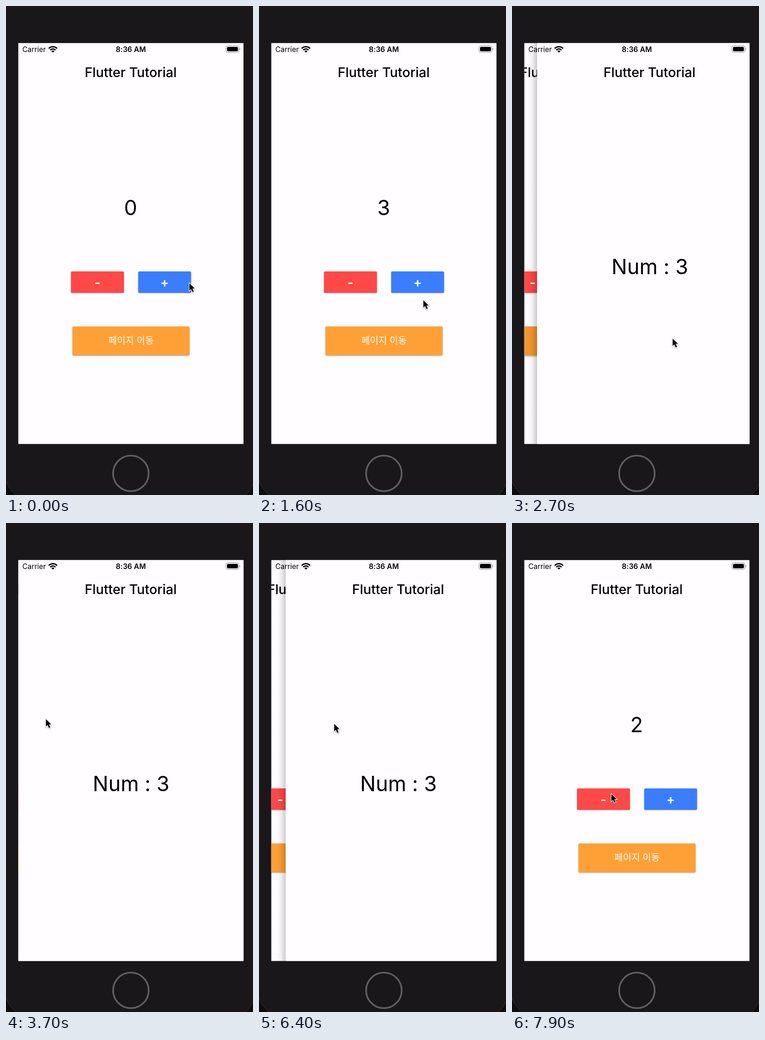
Recreate the animation shown at these times as an HTML page. Size 532 by 1052 pixels, loop 8000 ms.

```html
<!DOCTYPE html>
<html lang="ko">
<head>
<meta charset="utf-8">
<title>Flutter Tutorial</title>
<style>
  html, body { margin: 0; width: 100%; height: 100%; overflow: hidden; background: #19171a; }
  svg { display: block; width: 100%; height: 100%; }
  text { font-family: Inter, "Noto Sans", sans-serif; text-anchor: middle; }
  .title { font-size: 28.6px; font-weight: 500; }
  .big { font-size: 44.8px; }
  .status { font-size: 15.5px; }
  .sign { font-size: 28px; font-weight: 600; fill: #fff; }
  .label { font: 500 20px "Noto Sans CJK KR", "Noto Sans CJK", sans-serif; fill: #fff; }
  #cursor { filter: drop-shadow(0 1.5px 1.5px rgba(0, 0, 0, .35)); }
</style>
</head>
<body>
<svg viewBox="0 0 532 1052">
  <defs>
    <clipPath id="screen"><rect x="26.5" y="79.8" width="485" height="862.5"/></clipPath>
    <linearGradient id="edge">
      <stop offset="0" stop-opacity="0"/>
      <stop offset=".3" stop-opacity=".016"/>
      <stop offset=".6" stop-opacity=".07"/>
      <stop offset="1" stop-opacity=".22"/>
    </linearGradient>
  </defs>

  <!-- phone body -->
  <g fill="#0d0d0e" stroke="#343335">
    <path d="M-1 1020Q6 1040 23 1053H-1z"/>
    <path d="M533 1027Q527 1042 515 1053H533z"/>
  </g>
  <circle cx="269" cy="1005.5" r="38.3" fill="none" stroke="#5f5e60" stroke-width="3.6"/>

  <g clip-path="url(#screen)">
    <rect x="26" y="79" width="486" height="864" fill="#fffdff"/>
    <g id="home">
      <text class="title" x="268.5" y="153">Flutter Tutorial</text>
      <text class="big" id="count" x="268.5" y="450">0</text>
      <g id="buttons"></g>
    </g>
    <g id="detail">
      <rect id="shade" x="2.5" y="79" width="24.2" height="864" fill="url(#edge)"/>
      <rect x="26.5" y="79" width="486" height="864" fill="#fffdff"/>
      <text class="title" x="268.5" y="153">Flutter Tutorial</text>
      <text class="big" x="269.3" y="576.5">Num : 3</text>
    </g>
  </g>

  <!-- status bar -->
  <text class="status" x="60.5" y="99">Carrier</text>
  <text class="status" x="269" y="99" font-weight="600" letter-spacing=".1">8:36 AM</text>
  <g transform="translate(101 100.3)" fill="none" stroke="#000" stroke-width="2.8">
    <path d="M-9 -8.8A12.6 12.6 0 0 1 9 -8.8M-5.7 -5.6A8 8 0 0 1 5.7 -5.6"/>
    <path d="M0 0L-3.3 -3.2A4.6 4.6 0 0 1 3.3 -3.2z" fill="#000" stroke="none"/>
  </g>
  <rect x="473.7" y="85.7" width="28" height="14.2" rx="4" fill="none" stroke="#8a8a8a"/>
  <rect x="476" y="88" width="23.5" height="9.6" rx="2.3"/>
  <path d="M503 90.5Q506 92.8 503 95z" fill="#8a8a8a"/>

  <g id="cursor">
    <path d="M0 0V16.8L3.8 13.2L7 20.3L10 19L7 12H12.2z" transform="scale(.94)"
          stroke="#fff" stroke-width="2.4" paint-order="stroke"/>
  </g>
</svg>
<script>
const $ = id => document.getElementById(id);
const LOOP = 8000, STEP = 100, WIDTH = 485, FADE = 150;
const clamp = v => Math.max(0, Math.min(1, v));
const easeOut = (u, power) => 1 - (1 - clamp(u)) ** power;

const buttons = [
  { id: 'minus', x: 140, y: 571, w: 114, h: 46, color: '#ff4848', text: '-', cls: 'sign', base: 605 },
  { id: 'plus', x: 284.8, y: 571, w: 113.7, h: 46, color: '#3b7dff', text: '+', cls: 'sign', base: 605 },
  { id: 'go', x: 143.3, y: 689.5, w: 252, h: 62, color: '#ffa036', text: '페이지 이동', cls: 'label', base: 727 }
];

$('buttons').innerHTML = buttons.map(b => {
  const rect = attrs => `<rect x="${b.x}" y="${b.y}" width="${b.w}" height="${b.h}" rx="2.6" ${attrs}/>`;
  return `<clipPath id="${b.id}Clip">${rect('')}</clipPath>
    ${rect(`id="${b.id}" fill="${b.color}"`)}
    ${rect(`id="${b.id}Tint"`)}
    <circle id="${b.id}Ripple" clip-path="url(#${b.id}Clip)"/>
    <text class="${b.cls}" x="${b.x + b.w / 2}" y="${b.base}">${b.text}</text>`;
}).join('');

const taps = [
  { id: 'plus', at: 250, hold: 150, add: 1 },
  { id: 'plus', at: 580, hold: 150, add: 1 },
  { id: 'plus', at: 960, hold: 150, add: 1 },
  { id: 'go', at: 2350, hold: 350, add: 0 },
  { id: 'minus', at: 7550, hold: 150, add: -1 }
];

// Pointer moves in order; it rests between them
const rest = { x: 395, y: 596.5 };
const moves = [
  { from: 0, to: 300, x: 357.5, y: 597.5 },      // plus button
  { from: 1300, to: 2300, x: 346, y: 715.5 },    // page button
  { from: 3300, to: 3700, x: 86, y: 422 },
  { from: 3800, to: 4200, x: 56, y: 411 },
  { from: 4300, to: 5190, x: 329, y: 424 },
  { from: 5190, to: 5700, x: 3, y: 432 },
  { from: 5800, to: 6100, x: 36, y: 430 },       // screen edge
  { from: 6300, to: 6600, x: 414, y: 437 },      // swipe back
  { from: 6600, to: 7500, x: 214, y: 583 }       // minus button
];

function pointer(t) {
  return moves.reduce((p, m) => {
    const u = clamp((t - m.from) / (m.to - m.from));
    return { x: p.x + (m.x - p.x) * u, y: p.y + (m.y - p.y) * u };
  }, rest);
}

// Pushed in, then dragged by the pointer, then flung out
function pageOffset(t) {
  const dragged = time => Math.max(0, pointer(time).x - 131);
  if (t < 6300) return WIDTH * (1 - easeOut((t - 2500) / 400, 4.14));
  const held = dragged(Math.min(t, 6500));
  return held + (WIDTH - held) * easeOut((t - 6500) / 300, 3);
}

function drawButton(id, t) {
  const tap = taps.find(p => p.id === id && t >= p.at && t < p.at + p.hold + FADE);
  const age = tap ? t - tap.at : 0;
  const press = tap ? clamp(age / 100) * clamp((tap.hold + FADE - age) / FADE) : 0;
  $(id).style.filter = `drop-shadow(0 0 .6px rgba(0,0,0,.15))
    drop-shadow(0 ${1.5 + press}px ${1.3 + press}px rgba(0,0,0,.33))`;
  $(id + 'Tint').setAttribute('opacity', .055 * press);
  const ripple = $(id + 'Ripple');
  ripple.setAttribute('opacity', .12 * press);
  if (!tap) return;
  const { x, y } = pointer(tap.at);
  ripple.setAttribute('cx', x);
  ripple.setAttribute('cy', y + 1);
  ripple.setAttribute('r', 4 + age * .047 + Math.max(0, age - 150) * .45);
}

function draw(t) {
  const off = pageOffset(t), shown = 1 - off / WIDTH, p = pointer(t);
  $('home').setAttribute('transform', `translate(${-shown * WIDTH / 3})`);
  $('detail').setAttribute('transform', `translate(${off})`);
  $('detail').setAttribute('visibility', shown > 0 ? 'visible' : 'hidden');
  $('shade').setAttribute('opacity', shown);
  $('count').textContent = taps.reduce((n, tap) => n + (t >= tap.at + tap.hold ? tap.add : 0), 0);
  buttons.forEach(b => drawButton(b.id, t));
  $('cursor').setAttribute('transform', `translate(${p.x} ${p.y})`);
}

let start;
function tick(now) {
  start ??= now;
  // The picture advances ten times a second
  draw(Math.floor(((now - start + 2) % LOOP) / STEP) * STEP);
  requestAnimationFrame(tick);
}
draw(0);
requestAnimationFrame(tick);
</script>
</body>
</html>
```
